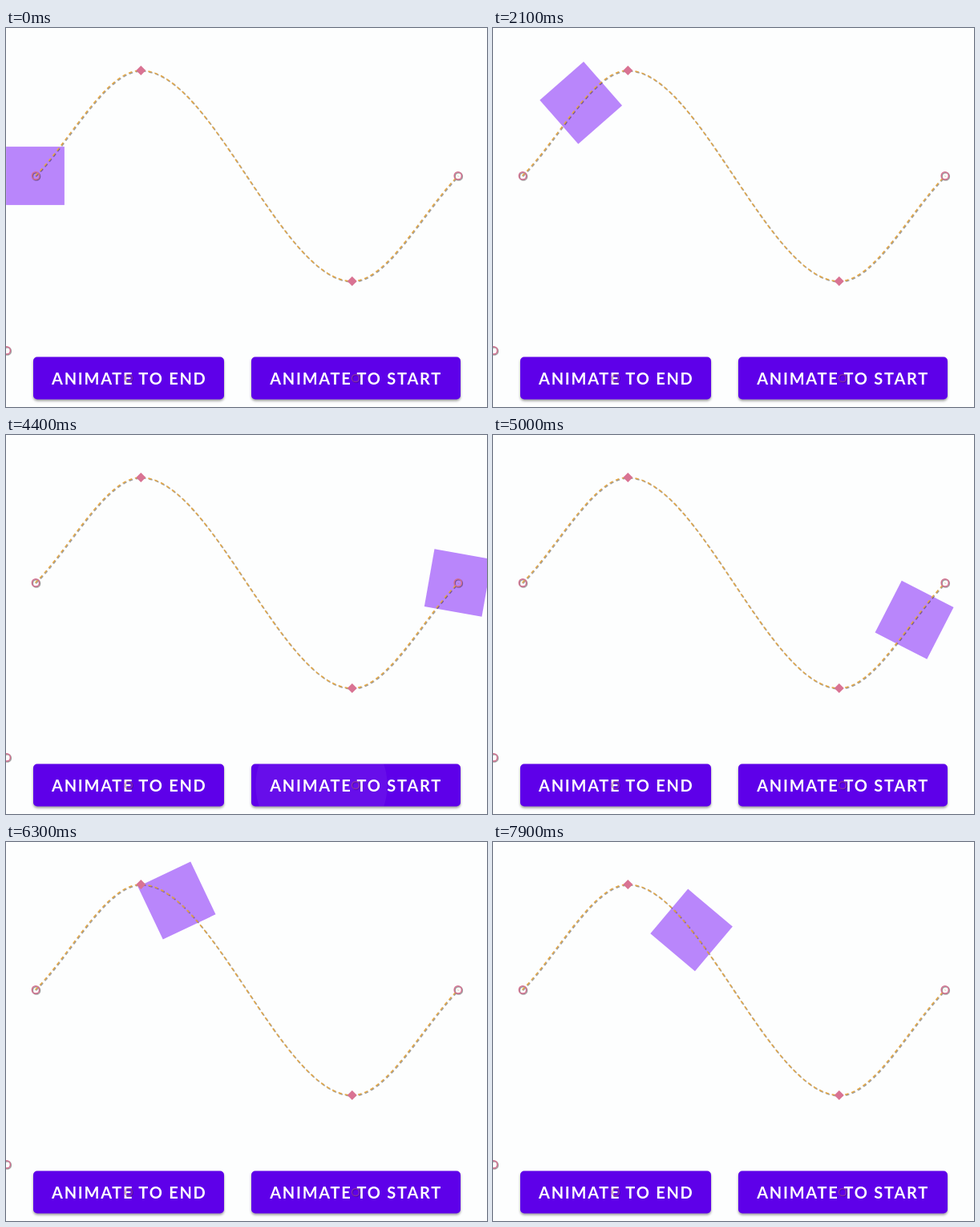
Animation of 600 by 473 pixels, one loop 8 s. Source, as an HTML page:

```html
<!DOCTYPE html>
<html lang="en">
<head>
<meta charset="utf-8">
<title>Keyframe path motion</title>
<style>
  html, body { margin: 0; width: 100%; height: 100%; overflow: hidden; background: #fdfefe; }
  svg { display: block; width: 600px; height: 473px; }
  text { font: 700 20px Lato, "Open Sans", sans-serif; letter-spacing: 1.75px; fill: #fff; }
  .button { fill: #5e00e9; }
  .shadow { filter: drop-shadow(0 2px 1.5px rgba(0, 0, 0, .38)); }
  .ripple { fill: #fff; opacity: 0; }
  .track { fill: none; stroke-width: 1.5; stroke-dasharray: 4.5 3.8; }
  .ring { fill: none; stroke-width: 1.5; }
  .faint { opacity: .5; }
</style>
</head>
<body>
<svg viewBox="0 0 600 473">
  <defs>
    <clipPath id="clipEnd"><rect x="34" y="410.5" width="238" height="53" rx="5"/></clipPath>
    <clipPath id="clipStart"><rect x="306" y="410.5" width="261" height="53" rx="5"/></clipPath>
    <path id="wave" d="M36.5 184.5C80.5 140.5 124.5 53 168.3 53C256 53 344 316 431.8 316C476 316 520 228.5 564 184.5"/>
    <g id="rings">
      <circle cx="37" cy="184.4" r="4.6"/>
      <circle cx="563.8" cy="184.4" r="4.6"/>
      <circle cx="0.8" cy="402.4" r="4.6"/>
    </g>
    <g id="buttonRings">
      <circle cx="152.8" cy="437" r="4.6"/>
      <circle cx="436" cy="437" r="4.6"/>
    </g>
    <path id="diamonds" d="M168.3 47l6 6l-6 6l-6 -6zM431.8 310l6 6l-6 6l-6 -6z"/>
  </defs>

  <rect id="box" x="-36.4" y="-36.4" width="72.8" height="72.8" fill="#b986fb"/>

  <rect class="button shadow" x="34" y="410.5" width="238" height="53" rx="5"/>
  <rect class="button shadow" x="306" y="410.5" width="261" height="53" rx="5"/>
  <g clip-path="url(#clipEnd)"><circle class="ripple" id="rippleEnd"/></g>
  <g clip-path="url(#clipStart)"><circle class="ripple" id="rippleStart"/></g>
  <text x="57" y="444.7">ANIMATE TO END</text>
  <text x="329.2" y="444.7">ANIMATE TO START</text>

  <g transform="translate(.8 .8)" opacity=".47">
    <use href="#wave" class="track" stroke="#000"/>
    <use href="#rings" class="ring" stroke="#000"/>
    <use href="#buttonRings" class="ring faint" stroke="#000"/>
  </g>
  <use href="#wave" class="track" stroke="#e5a743"/>
  <use href="#rings" class="ring" stroke="#d66f90"/>
  <use href="#buttonRings" class="ring faint" stroke="#b45a80"/>
  <use href="#diamonds" fill="#d97393"/>
</svg>
<script>
  const LOOP = 8000, TRAVEL = 3000, STEP = 100;
  const byId = id => document.getElementById(id);
  const clamp = v => Math.min(1, Math.max(0, v));

  // Each tap sends the box toward one end of the path.
  const taps = [
    { at: 1371, dir: 1 },
    { at: 4478, dir: -1 },
    { at: 6426, dir: 1 },
    { at: 7291, dir: -1 }
  ];
  const buttons = [
    { dir: 1, node: byId('rippleEnd'), from: 146, to: 153 },
    { dir: -1, node: byId('rippleStart'), from: 390, to: 436.5 }
  ];

  function linearPosition(t) {
    let pos = 0;
    taps.forEach((tap, i) => {
      const until = Math.min(t, i + 1 < taps.length ? taps[i + 1].at : LOOP);
      if (until > tap.at) pos = clamp(pos + tap.dir * (until - tap.at) / TRAVEL);
    });
    return pos;
  }

  const smooth = u => u * u * (3 - 2 * u);
  // Hermite segment that leaves at a slope of one and arrives flat.
  const rise = u => smooth(u) + u * (1 - u) ** 2;

  function pathY(p) {
    if (p < .25) return 184.5 - 131.5 * rise(p * 4);
    if (p < .75) return 53 + 263 * smooth((p - .25) * 2);
    return 184.5 + 131.5 * rise((1 - p) * 4);
  }

  function drawBox(t) {
    const p = .5 - .5 * Math.cos(Math.PI * linearPosition(t));
    const x = 36.5 + 527.5 * p;
    byId('box').setAttribute('transform', `translate(${x} ${pathY(p)}) rotate(${1000 * p})`);
  }

  function drawRipple({ dir, node, from, to }, t) {
    const tap = taps.filter(k => k.dir === dir && t >= k.at - 95).pop();
    const age = tap ? t - tap.at + 95 : -1;
    const grow = clamp(age / 225);
    node.setAttribute('cx', from + (to - from) * grow);
    node.setAttribute('cy', 437);
    node.setAttribute('r', 78 + 55 * grow);
    node.style.opacity = age < 0 ? 0 : .24 * clamp(age / 75) * clamp((375 - age) / 150);
  }

  const began = performance.now();

  function frame() {
    const elapsed = (performance.now() - began + 8) % LOOP;
    const t = Math.floor(elapsed / STEP) * STEP;
    drawBox(t);
    buttons.forEach(b => drawRipple(b, t));
    requestAnimationFrame(frame);
  }
  frame();
</script>
</body>
</html>
```
